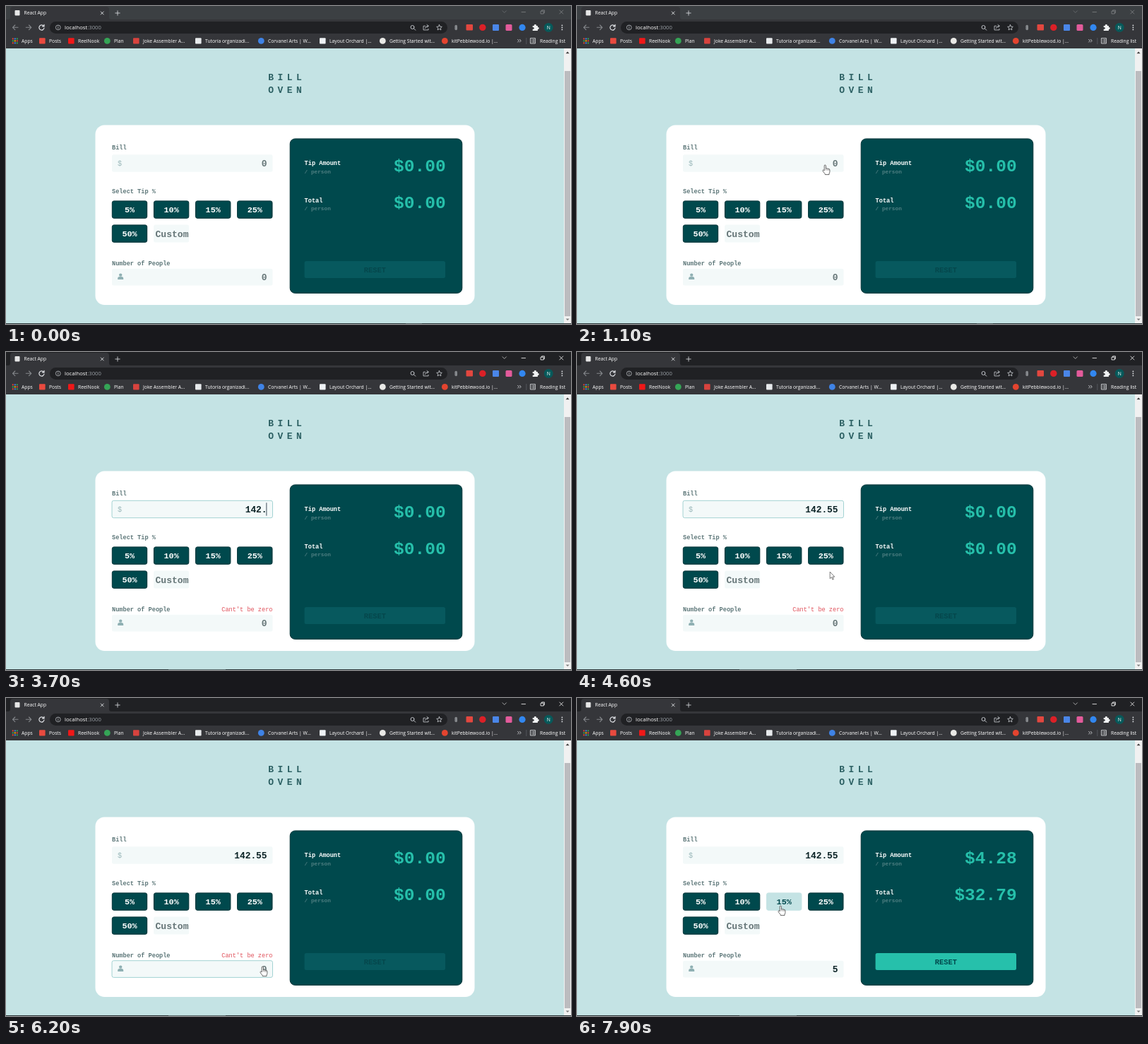
Animation of 800x450 px, one loop 8 s. Source, as an HTML page:

```html
<!DOCTYPE html>
<html lang="en">
<head>
<meta charset="utf-8">
<title>Tip calculator</title>
<style>
html, body { margin: 0; width: 100%; height: 100%; overflow: hidden; background: #c4e3e4; }
svg { display: block; width: 100vw; height: 100vh; }
text { white-space: pre; }
.ui { font-family: "Open Sans", "Noto Sans", sans-serif; font-size: 6.75px; fill: #fff; }
.mono { font-family: "Liberation Mono", "DejaVu Sans Mono", monospace; }
.line { fill: none; stroke-linecap: round; stroke-linejoin: round; }
</style>
</head>
<body>
<svg id="stage" viewBox="0 0 800 450"></svg>
<script>
const LOOP = 8000, STEP = 100;
const NS = "http://www.w3.org/2000/svg";
const stage = document.getElementById("stage");
const DEEP = "#00494d", EDGE = "#003135", MINT = "#26c0ab", PALE = "#c4e3e4", FIELD = "#f3f9f9", SLATE = "#5c7678";

function add(tag, attrs, parent = stage) {
  const el = document.createElementNS(NS, tag);
  for (const k in attrs) el.setAttribute(k, attrs[k]);
  parent.appendChild(el);
  return el;
}
const rect = (x, y, width, height, fill, rx = 0, more = {}) =>
  add("rect", { x, y, width, height, fill, rx, ...more });
const dot = (cx, cy, r, fill) => add("circle", { cx, cy, r, fill });
const line = (d, stroke = "#dfe1e5", w = 1, parent = stage) =>
  add("path", { d, stroke, "stroke-width": w, class: "line" }, parent);
function label(x, y, str, more = {}, cls = "ui") {
  const el = add("text", { x, y, class: cls, ...more });
  el.textContent = str;
  return el;
}
const mono = (x, y, str, size, fill, anchor = "start", weight = 700) =>
  label(x, y, str, { fill, "text-anchor": anchor, style: `font-size:${size}px;font-weight:${weight}` }, "mono");
const show = (el, on) => el.setAttribute("visibility", on ? "visible" : "hidden");
const setText = (el, str) => { if (el.textContent !== str) el.textContent = str; };

// Browser window
rect(0, 0, 800, 60, "#35363a");
const strip = rect(0, 0, 800, 19, "#202124");
add("path", { d: "M3 19Q6 19 6 16V5Q6 1 10 1H142Q146 1 146 5V16Q146 19 149 19Z", fill: "#35363a" });
rect(12.5, 6, 7, 7.5, "#e6e6e6", 1);
label(25.5, 12.4, "React App");
line("M134.2 8l4 4M138.2 8l-4 4", "#dfe1e5", .9);
line("M154.8 10h6.4M158 6.8v6.4", "#dfe1e5", .8);
const winButtons = add("g", {});
line("M703 6.8l2.7 2.7 2.7-2.7", "#c8c8c8", .8, winButtons);
line("M730 8.6h5.5M757.4 7.2h3.8v3.8h-3.8zM758.6 7V5.9h3.8v3.8h-1.1M783.8 6l5 5M788.8 6l-5 5", "#fff", .8, winButtons);

line("M17 30.3H9.5M12.8 27l-3.3 3.3 3.3 3.3", "#85888c", 1.1);
line("M28.3 30.3h7.5M32.5 27l3.3 3.3-3.3 3.3", "#85888c", 1.1);
line("M53.3 28.3A3.6 3.6 0 1 0 54 31M54 26.4v2.5h-2.5", "#e2e4e8", 1.2);
rect(62, 22, 563, 17, "#202124", 8.5);
add("circle", { cx: 73.8, cy: 30.4, r: 3.4, fill: "none", stroke: "#bdc1c6", "stroke-width": .8 });
line("M73.8 30v2M73.8 28.5v.1", "#bdc1c6", .8);
const url = label(83, 33, "localhost", { style: "font-size:7.7px" });
add("tspan", { fill: "#9aa0a6" }, url).textContent = ":3000";

line("M578 30a2.5 2.5 0 1 0-5 0a2.5 2.5 0 0 0 5 0M577.4 31.8l2.4 2.4", "#d0d3d8", .9);
line("M593.5 28.3H591v5.6h7v-1.6M593.4 31.5q.4-3.2 4.3-3.2M596 26.5l2.4 1.8-2.4 1.9", "#d0d3d8", .8);
line("M613.5 26.6l1.1 2.5 2.7.3-2 1.8.6 2.7-2.4-1.4-2.4 1.4.6-2.7-2-1.8 2.7-.3z", "#d0d3d8", .8);
rect(635.4, 26.8, 3.6, 7.4, "#85888c", 1.8);
rect(651.5, 26, 9.5, 8.5, "#e2473f", 1);
dot(674.8, 30.4, 4.7, "#dc2027");
rect(689, 26, 9, 9, "#4a86e8", 1);
rect(707.5, 26, 9, 9, "#e35b9b", 1.5);
dot(731, 30.4, 4.6, "#3287f0");
add("path", { d: "M745.7 28h2.2a1.5 1.5 0 1 1 2.8 0h2.2v2.2a1.4 1.4 0 1 1 0 2.7v2h-7.2v-2.2a1.4 1.4 0 1 0 0-2.5z", fill: "#f1f3f4" });
dot(768.2, 30.4, 6.4, "#07595a");
label(768.2, 32.8, "N", { "text-anchor": "middle" });
for (const y of [27.4, 30.4, 33.4]) dot(787.4, y, .9, "#dfe1e5");

// Bookmarks: text x, text, icon shape and colour
const hues = ["#ea4335", "#fbbc04", "#34a853", "#4285f4"];
for (let i = 0; i < 9; i++) dot(9.8 + i % 3 * 3, 46.4 + Math.floor(i / 3) * 3, 1.1, hues[(i * 3 + Math.floor(i / 3)) % 4]);
label(22, 51.5, "Apps");
[
  [61, "Posts", "s", "#e94a3f"],
  [102, "ReelNook", "s", "#f01818"],
  [153, "Plan", "c", "#35a556"],
  [194, "Joke Assembler A...", "s", "#d8433e"],
  [282, "Tutoría organizadi...", "s", "#e7eaec"],
  [371, "Corvanel Arts | W...", "c", "#3f83e6"],
  [458, "Layout Orchard |...", "s", "#eef2f5"],
  [543, "Getting Started wit...", "c", "#e9e9e6"],
  [631, "kitPebblewood.io |...", "c", "#e4442f"]
].forEach(([x, str, kind, hue]) => {
  if (kind === "c") dot(x - 9.7, 49.4, 4.4, hue);
  else rect(x - 14, 45.2, 8.6, 8.4, hue, 1);
  label(x, 51.5, str);
});
line("M724.6 47.3l1.8 1.9-1.8 1.9M727.4 47.3l1.8 1.9-1.8 1.9", "#dfe1e5", .8);
rect(736.5, 45, .7, 9, "#5f6368");
line("M742.8 45.6h6.6v7.4h-6.6zM746 47.6h2M746 49.4h2M746 51.2h2M744.3 47.6h.1M744.3 49.4h.1M744.3 51.2h.1", "#e8eaed", .8);
label(756, 51.5, "Reading list");

// Page and scrollbar
rect(0, 60, 800, 390, PALE);
rect(790, 60, 10, 389, "#f1f1f1");
rect(791, 92, 8, 347, "#bcbcbf");
add("path", { d: "M792.6 67.2h5l-2.5-2.7z", fill: "#3c3c3c" });
add("path", { d: "M792.6 442.4h5l-2.5 2.7z", fill: "#7d7d7d" });
rect(0, 449, 800, 1, "#2a3436");
const taskIdle = rect(566, 449, 23, 1, "#4b5658");
const taskOn = rect(230, 449, 81, 1, "#5c6c6e");

["BILL", "OVEN"].forEach((word, row) =>
  [...word].forEach((ch, i) => mono(375.2 + i * 13.2, 104.6 + row * 18.8, ch, 13, "#2b5f62", "middle")));

rect(126.5, 168.5, 537, 254.5, "#fff", 13);
rect(402.2, 187.9, 243.6, 218.4, DEEP, 7, { stroke: EDGE });

mono(150, 202.8, "Bill", 8.6, SLATE);
mono(150, 265, "Select Tip %", 8.6, SLATE);
mono(150, 367, "Number of People", 8.6, SLATE);
const error = mono(377.5, 367, "Cant't be zero", 8.6, "#e0505a", "end", 400);

function makeField(y, h) {
  const box = rect(150, y, 227.5, h, FIELD, 2.5, { "stroke-width": 1 });
  const value = mono(369.6, y + h / 2 + 4.7, "0", 12.9, "#00292c", "end");
  const caret = rect(368.5, y + 3, .8, h - 6, "#123");
  return { box, value, caret, zone: [150, y, 227.5, h] };
}
const bill = makeField(210.3, 24.4);
const people = makeField(371.7, 23.7);
mono(158, 226.2, "$", 10.2, "#9ab8ba", "start", 400);
dot(162.2, 380.6, 2.2, "#8fb0b3");
add("path", { d: "M158.2 387V385.6Q158.2 382.9 160.5 382.9H163.9Q166.2 382.9 166.2 385.6V387Z", fill: "#8fb0b3" });

const tips = [5, 10, 15, 25, 50].map((pct, i) => {
  const x = 150 + i % 4 * 59.1, y = i < 4 ? 275.6 : 309.6;
  const box = rect(x + .3, y + .3, 49.4, 24.4, DEEP, 2.5);
  const text = mono(x + 25, y + 16.6, pct + "%", 11.8, "#fff", "middle");
  return { pct, box, text, zone: [x, y, 50, 25] };
});
const customZone = [209.1, 309.6, 50, 25];
rect(...customZone, FIELD, 2.5);
mono(235, 326.9, "Custom", 13.1, "#657577", "middle");

function makeResult(y, name) {
  mono(422.6, y - 8.6, name, 8.6, "#fff");
  mono(422.6, y + 3, "/ person", 7.75, "#4f7f82");
  return mono(622.6, y, "$0.00", 24.5, MINT, "end");
}
const tipOut = makeResult(234, "Tip Amount");
const totalOut = makeResult(286.2, "Total");
const reset = rect(422.6, 361, 199.4, 24, MINT, 2.5);
const resetText = mono(522.3, 376.8, "RESET", 10.4, DEEP, "middle");
const resetZone = [422.6, 361, 199.4, 24];

// Pointer shapes, tip at the origin
const hand = add("g", {});
add("path", {
  d: "M-1.3 1Q-1.3 0 -.3 0T.9 1V5Q1.7 4.3 2.7 5.1Q3.7 4.5 4.5 5.5Q6.3 5.2 6.4 7V9.4Q6.3 11 5.5 12V13.6H-.3V12.6Q-1.8 11 -3.3 8.7Q-4 7.3 -2.9 7Q-2 7 -1.3 8Z",
  fill: "#fff", stroke: "#444", "stroke-width": .8, "stroke-linejoin": "round"
}, hand);
line("M.9 5.2v2M2.8 5.6v1.8M4.6 6v1.6", "#444", .5, hand);
const arrow = add("path", {
  d: "M0 0V9.5L2.2 7.5L3.7 11L5.2 10.4L3.7 7H6.6Z",
  fill: "#fff", stroke: "#444", "stroke-width": .7, "stroke-linejoin": "round"
});

// Story: keystrokes, clicks and pointer moves
const billKeys = [[2100, "1"], [2700, "14"], [3100, "142"], [3700, "142."], [3900, "142.5"], [4100, "142.55"]];
const BILL_CLICK = 1300, PEOPLE_CLICK = 5500, PEOPLE_KEY = 6400, TIP_CLICK = 7500;
const caretStarts = [BILL_CLICK, ...billKeys.map(k => k[0]), PEOPLE_CLICK, PEOPLE_KEY];
const moves = [
  [100, 1000, 620, 402, 351.5, 225],
  [4250, 5300, 351.5, 225, 363.5, 380],
  [6450, 6800, 363.5, 380, 318, 257],
  [6800, 7200, 318, 257, 288.5, 294]
];

function pointerAt(t) {
  const m = moves.filter(m => t >= m[0]).pop() || moves[0];
  const p = Math.min(1, Math.max(0, (t - m[0]) / (m[1] - m[0])));
  const e = 1 - (1 - p) ** 2;
  const typing = (t >= 2100 && t < 4250) || (t >= PEOPLE_KEY && t < 6450);
  return { x: m[2] + (m[4] - m[2]) * e, y: m[3] + (m[5] - m[3]) * e, on: t >= 100 && !typing };
}

function drawField(f, value, focused, caretOn) {
  setText(f.value, value || "0");
  f.value.setAttribute("fill", value ? "#0b2326" : "#657577");
  f.box.setAttribute("stroke", focused ? "#a3d3d3" : "none");
  show(f.caret, focused && caretOn);
}

function draw(t) {
  const ptr = pointerAt(t);
  const over = ([x, y, w, h]) => ptr.on && ptr.x >= x && ptr.x <= x + w && ptr.y >= y && ptr.y <= y + h;
  const typed = billKeys.filter(k => t >= k[0]).pop();
  const amount = typed ? typed[1] : "";
  const ready = t >= PEOPLE_KEY, tipped = t >= TIP_CLICK;
  const active = t >= BILL_CLICK;

  strip.setAttribute("fill", active ? "#202124" : "#3c4043");
  winButtons.setAttribute("opacity", active ? 1 : .35);
  show(taskIdle, !active);
  show(taskOn, active);

  const last = caretStarts.filter(s => t >= s).pop() || 0;
  const caretOn = (t - last) % 1000 < 500;
  drawField(bill, amount, active && t < PEOPLE_CLICK, caretOn);
  drawField(people, ready ? "5" : "", t >= PEOPLE_CLICK && !tipped, caretOn);
  show(error, amount && !ready);

  for (const tip of tips) {
    const lit = over(tip.zone) || (tipped && tip.pct === 15);
    tip.box.setAttribute("fill", lit ? PALE : DEEP);
    tip.box.setAttribute("stroke", lit ? PALE : EDGE);
    tip.text.setAttribute("fill", lit ? DEEP : "#fff");
  }

  const each = 142.55 / 5, share = tipped ? each * .15 : 0;
  setText(tipOut, !ready ? "$0.00" : tipped ? "$" + share.toFixed(2) : "$0");
  setText(totalOut, ready ? "$" + (each + share).toFixed(2) : "$0.00");
  reset.setAttribute("fill", ready ? MINT : "#07595e");
  resetText.setAttribute("fill", ready ? DEEP : "#05474c");

  const zones = [bill.zone, people.zone, customZone, resetZone, ...tips.map(b => b.zone)];
  const grab = zones.some(over);
  const place = `translate(${ptr.x} ${ptr.y})`;
  hand.setAttribute("transform", place);
  arrow.setAttribute("transform", place);
  show(hand, ptr.on && grab);
  show(arrow, ptr.on && !grab);
}

function tick() {
  const t = performance.now() % LOOP;
  draw(Math.floor(t / STEP) * STEP);
  requestAnimationFrame(tick);
}
tick();
</script>
</body>
</html>
```
